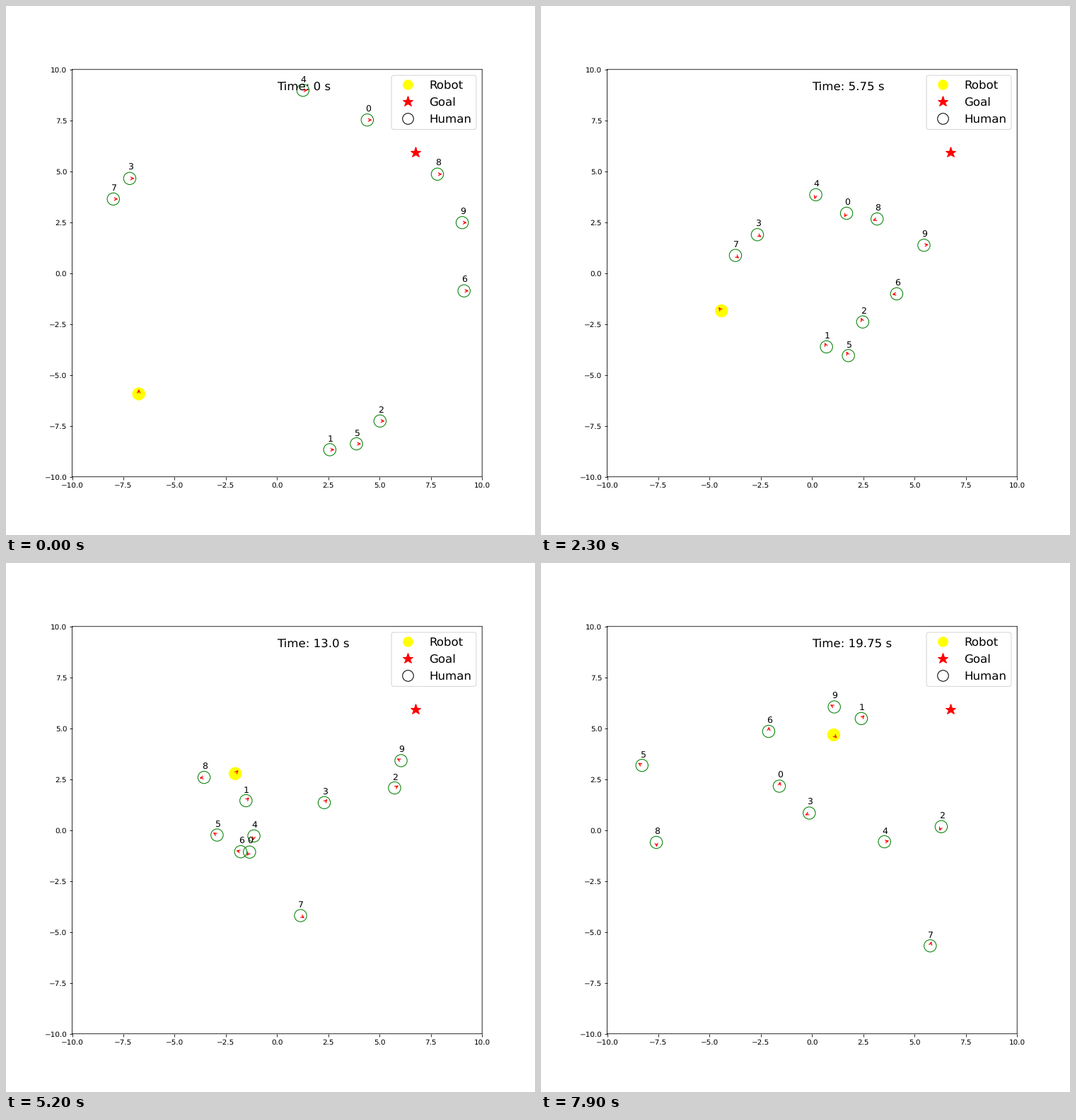
These frames come from a looping animation (748 px wide and 748 px high, 8 s). A matplotlib script:

```python
import numpy as np
import matplotlib.pyplot as plt
from matplotlib.animation import FuncAnimation
from matplotlib.lines import Line2D
from matplotlib.patches import ArrowStyle, Circle, FancyArrowPatch

FRAMES, INTERVAL, STEP = 80, 100, 0.25
RADIUS, SPEED = 0.3, 1.0
APPROACH = 9  # steps everyone walks freely towards the middle
HOME = np.array([-6.75, -5.93])

plt.rcParams.update({"font.family": "DejaVu Sans", "text.hinting": "none",
                     "path.snap": False})
fig, ax = plt.subplots(figsize=(10, 10), dpi=74.8)
ax.set(xlim=(-10, 10), ylim=(-10, 10))


class Walker:
    """Disc that heads for the middle, then for each (step, x, y) turn."""

    def __init__(self, start, *turns, label=None, heading=0.0, **style):
        start = np.array(start)
        walked = APPROACH * STEP * SPEED
        near = start * (1 - walked / np.hypot(*start))
        steps, xs, ys = np.array([(0, *start), (APPROACH, *near), *turns]).T
        grid = np.arange(FRAMES)
        self.path = np.column_stack([np.interp(grid, steps, xs),
                                     np.interp(grid, steps, ys)])
        move = np.diff(self.path, axis=0)
        self.angle = np.r_[heading, np.arctan2(move[:, 1], move[:, 0])]
        self.disc = ax.add_patch(Circle(start, RADIUS, **style))
        self.arrow = ax.add_patch(FancyArrowPatch(
            (0, 0), (1, 0), color="red",
            arrowstyle=ArrowStyle("->", head_length=4, head_width=2)))
        self.label = label and ax.text(0, 0, label, fontsize=12)

    def show(self, i):
        (x, y), a = self.path[i], self.angle[i]
        self.disc.center = x, y
        self.arrow.set_positions((x, y), (x + RADIUS * np.cos(a),
                                          y + RADIUS * np.sin(a)))
        if self.label:
            self.label.set_position((x - 0.11, y + 0.4))


def human(label, start, *turns):
    return Walker(start, *turns, label=label, fill=False, color="green")


def marker(shape, face, edge):
    return Line2D([], [], linestyle="None", marker=shape, markersize=15,
                  markerfacecolor=face, markeredgecolor=edge)


walkers = [
    Walker(HOME, (18, -3.6, -2.8), (28, -5.24, -0.9), (43, -2.98, 1.75),
           (75, 0.35, 5.4), (79, 1.05, 4.68),
           heading=np.pi / 2, color="yellow"),
    human("0", (4.4, 7.52), (23, 1.68, 2.94), (43, -0.16, 0.41),
          (60, -2.4, -2.4), (79, -1.6, 2.16)),
    human("1", (2.57, -8.67), (23, 0.7, -3.62), (48, -2.1, 0.85),
          (79, 2.4, 5.48)),
    human("2", (5.02, -7.26), (32, 1.65, -0.46), (62, 7.77, 3.34),
          (79, 6.3, 0.17)),
    human("3", (-7.19, 4.65), (42, 0.9, -0.2), (62, 3.7, 2.9),
          (79, -0.14, 0.84)),
    human("4", (1.26, 8.98), (23, 0.18, 3.85), (43, -0.85, 1.41),
          (59, -1.35, -1.6), (79, 3.53, -0.57)),
    human("5", (3.87, -8.38), (23, 1.77, -4.05), (43, -1.14, -1.38),
          (79, -8.3, 3.18)),
    human("6", (9.12, -0.87), (43, 0.19, -1.53), (56, -2.65, -0.85),
          (79, -2.12, 4.85)),
    human("7", (-7.99, 3.64), (23, -3.74, 0.87), (43, -0.68, -3.02),
          (73, 5.4, -6.94), (79, 5.76, -5.68)),
    human("8", (7.82, 4.86), (23, 3.17, 2.66), (43, -1.32, 2.93),
          (69, -7.8, 1.95), (79, -7.6, -0.6)),
    human("9", (9.03, 2.48), (19, 4.55, 1.2), (38, 8.85, 2.0),
          (61, 4.24, 4.32), (79, 1.08, 6.05)),
]

ax.plot(*-HOME, linestyle="None", marker="*", markersize=15, color="red")
clock = ax.text(0, 9, "", fontsize=16)
ax.legend([marker("o", "yellow", "white"), marker("*", "red", "red"),
           marker("o", "none", "black")],
          ["Robot", "Goal", "Human"], fontsize=16, loc="upper right")


def update(i):
    for walker in walkers:
        walker.show(i)
    clock.set_text(f"Time: {i * STEP if i else 0} s")


anim = FuncAnimation(fig, update, frames=FRAMES, interval=INTERVAL,
                     init_func=lambda: update(0), repeat=True, repeat_delay=0)
plt.show()
```
